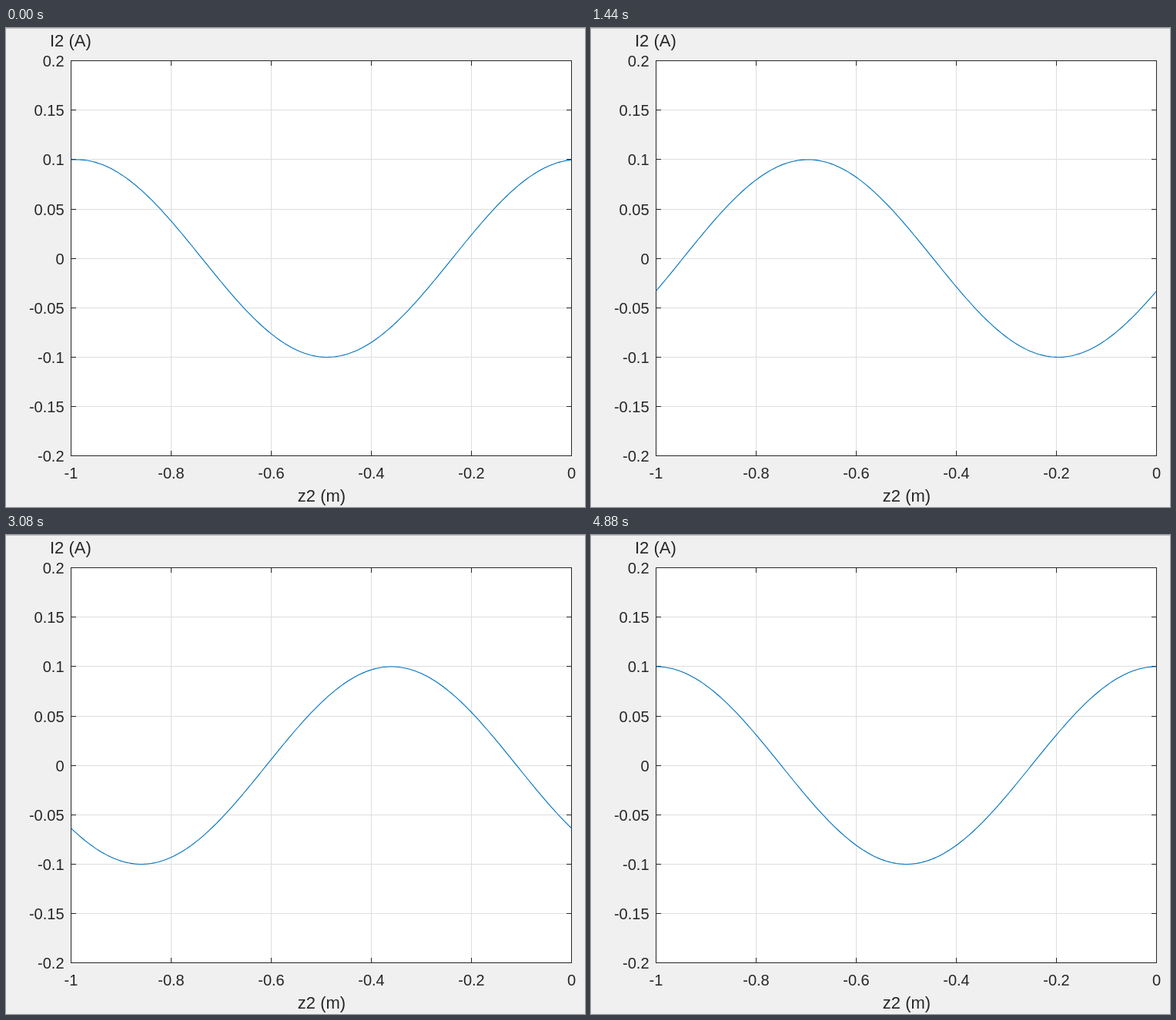
These frames come from a looping animation (752 px wide and 622 px high, 4920 ms). An HTML page with a canvas:

```html
<!DOCTYPE html>
<html lang="en">
<head>
<meta charset="utf-8">
<title>Travelling current wave</title>
<style>
html, body { margin: 0; width: 100%; height: 100%; overflow: hidden; background: #f0f0f0; }
canvas { display: block; }
</style>
</head>
<body>
<canvas id="stage" width="752" height="622"></canvas>
<script>
const ctx = document.getElementById('stage').getContext('2d');
const INK = '#262626', GRID = '#dedede', WAVE = '#0072bd';
const LOOP = 4920, STEP = 40;
const LEFT = 84, TOP = 42, WIDTH = 650, HEIGHT = 513, TICK = 7;

// Time in ms and crest offset in metres from z = -1; the pace is slightly uneven.
const CRESTS = [[0, .0117], [600, .127], [1440, .3035], [2640, .5505],
                [3480, .722], [4240, .8765], [4880, 1]];

const gridX = i => LEFT + i * WIDTH / 5;
const gridY = i => Math.floor(TOP + 0.7 + i * HEIGHT / 8);

function rect(color, x, y, w, h) {
  ctx.fillStyle = color;
  ctx.fillRect(x, y, w, h);
}

function text(str, x, y, size, align) {
  ctx.font = size + 'px "Liberation Sans", Arial, sans-serif';
  ctx.textAlign = align;
  ctx.fillStyle = INK;
  ctx.fillText(str, x, y);
}

function drawAxes() {
  rect('#f0f0f0', 0, 0, 752, 622);
  rect('#c0c0c0', 0, 0, 752, 1);
  rect('#ffffff', LEFT, TOP, WIDTH + 1, HEIGHT + 1);
  for (let i = 1; i < 5; i++) rect(GRID, gridX(i), TOP, 1, HEIGHT);
  for (let i = 1; i < 8; i++) rect(GRID, LEFT, gridY(i), WIDTH, 1);

  for (let i = 0; i <= 5; i++) {
    const x = gridX(i);
    rect(INK, x, TOP, 1, TICK);
    rect(INK, x, TOP + HEIGHT - TICK + 1, 1, TICK);
    text(String((i - 5) / 5), x + 0.5, 585, 20, 'center');
  }
  for (let i = 0; i <= 8; i++) {
    const y = gridY(i);
    rect(INK, LEFT, y, TICK, 1);
    rect(INK, LEFT + WIDTH - TICK + 1, y, TICK, 1);
    text(String((4 - i) / 20), 75.5, y + 8, 20, 'right');
  }
  ctx.strokeStyle = INK;
  ctx.lineWidth = 1;
  ctx.strokeRect(LEFT + 0.5, TOP + 0.5, WIDTH, HEIGHT);
  text('I2 (A)', 57, 24, 22, 'left');
  text('z2 (m)', 410, 615, 22, 'center');
}

function crestAt(t) {
  const i = Math.max(1, CRESTS.findIndex(([time]) => time >= t));
  const [t0, c0] = CRESTS[i - 1], [t1, c1] = CRESTS[i];
  return c0 + (c1 - c0) * (t - t0) / (t1 - t0);
}

function drawWave(crest) {
  ctx.beginPath();
  for (let i = 0; i <= 200; i++) {
    const u = i / 200;
    ctx.lineTo(LEFT + 0.5 + u * WIDTH,
               299.2 - HEIGHT / 4 * Math.cos(2 * Math.PI * (u - crest)));
  }
  ctx.strokeStyle = WAVE;
  ctx.lineWidth = 1.1;
  ctx.stroke();
}

function draw(now) {
  const t = Math.floor((now % LOOP) / STEP) * STEP;
  drawAxes();
  drawWave(crestAt(t));
  requestAnimationFrame(draw);
}

draw(0);
</script>
</body>
</html>
```
